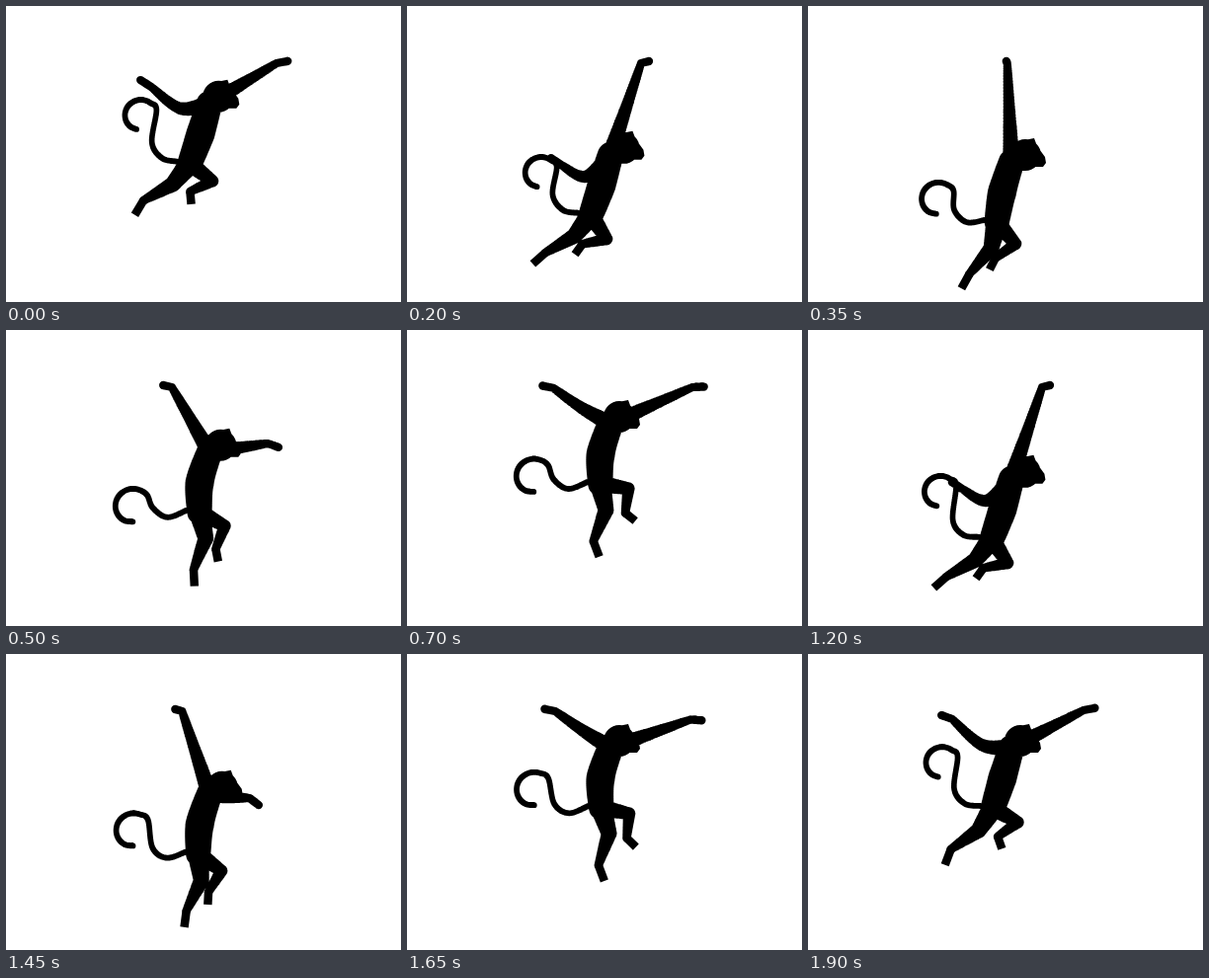
Write an HTML page that moves like this. It is 400 px wide and 300 px high and loops after 1950 ms.

```html
<!DOCTYPE html>
<html lang="en">
<head>
<meta charset="utf-8">
<title>Swinging monkey</title>
<style>
  html, body { margin: 0; width: 100%; height: 100%; overflow: hidden; background: #fff; }
  svg { display: block; width: 100vw; height: 100vh; }
</style>
</head>
<body>
<svg viewBox="0 0 400 300">
  <path id="body"/>
  <path id="feet" fill="none" stroke="#000" stroke-width="8.5"/>
</svg>
<script>
const LOOP = 1950, STEP = 50, SWING = 1000, CYCLE = 2 * SWING, RAD = Math.PI / 180;

// time, x, y of the wrist: hold the branch, let go, swing under, reach the next one
const wristPath = [
  [0, 274, 58], [200, 237, 58], [500, 168, 58], [650, 150, 58],
  [950, 146, 66], [1000, 147, 82], [1200, 156, 161], [1350, 200, 205],
  [1500, 265, 115], [1700, 289, 58], [1950, 279, 57]
];
const face = [[8, -22], [18, -24], [21, -16], [29, -5], [30, 1], [27, 5], [12, 5]];

const add = (a, b) => [a[0] + b[0], a[1] + b[1]];
const mix = (a, b, u) => a + (b - a) * u;
const wave = (time, peak, period = SWING) => Math.cos(2 * Math.PI * (time - peak) / period);

function ease(from, to, time) {
  const u = Math.max(0, Math.min(1, (time - from) / (to - from)));
  return Math.sin(u * Math.PI / 2) ** 2;
}

function hermite(a, b, ta, tb, u) {
  const v = 1 - u;
  return a * v * v * (1 + 2 * u) + b * u * u * (3 - 2 * u) + ta * u * v * v - tb * u * u * v;
}

function wristAt(time) {
  time = (time + CYCLE) % CYCLE;
  const n = wristPath.length;
  const key = i => {
    const turn = Math.floor(i / n), [t, x, y] = wristPath[i - turn * n];
    return [t + turn * CYCLE, x, y];
  };
  let i = n - 1;
  while (wristPath[i][0] > time) i--;
  const [a, b, c, d] = [i - 1, i, i + 1, i + 2].map(key);
  const span = c[0] - b[0];
  return [1, 2].map(k => hermite(b[k], c[k],
    (c[k] - a[k]) / (c[0] - a[0]) * span,
    (d[k] - b[k]) / (d[0] - b[0]) * span,
    (time - b[0]) / span));
}

const dot = ([x, y], r) => {
  r = +r.toFixed(2);
  return `M${(x - r).toFixed(2)} ${y.toFixed(2)}a${r} ${r} 0 1 1 ${2 * r} 0a${r} ${r} 0 1 1 ${-2 * r} 0z`;
};
const line = points => "M" + points.map(p => p.map(v => v.toFixed(2)).join(" ")).join("L");

// A rounded band of varying radius; without bend its joints stay sharp
function band(points, radii, bend = true) {
  const samples = 18, last = points.length - 1;
  const point = i => points[Math.max(0, Math.min(last, i))];
  let d = "";
  for (let i = 0; i < last; i++) {
    for (let s = 0; s <= samples; s++) {
      const u = s / samples;
      const spot = [0, 1].map(c => {
        const a = point(i)[c], b = point(i + 1)[c];
        if (!bend) return mix(a, b, u);
        return hermite(a, b, (b - point(i - 1)[c]) / 2, (point(i + 2)[c] - a) / 2, u);
      });
      d += dot(spot, mix(radii[i], radii[i + 1], u));
    }
  }
  return d;
}

function arm(shoulder, time) {
  time %= CYCLE;
  const wrist = wristAt(time);
  const drag = (wristAt(time + STEP / 2)[1] - wristAt(time - STEP / 2)[1]) / 4;
  const tip = add(wrist, [12 * Math.tanh((wrist[0] - 205) / 40), -2 - drag]);
  const slack = 17 * ease(550, 1200, time) * (1 - ease(1200, 1500, time));
  const elbow = [0, 1].map(c => mix(shoulder[c], wrist[c], 0.5) + c * slack);
  return band([shoulder, elbow, wrist], [9, 6.3, 4]) + band([wrist, tip], [4, 4.2], false);
}

// Joints of a leg from the hip down; angles are measured forward from straight down
function leg(hip, angles, lengths) {
  const joints = [hip];
  angles.forEach((angle, i) => {
    const a = angle * RAD;
    joints.push(add(joints[i], [lengths[i] * Math.sin(a), lengths[i] * Math.cos(a)]));
  });
  return joints;
}

function tail(hip, time) {
  const lift = 0.5 - wave(time, 90) / 2 - 0.05 * wave(time, 0, CYCLE);
  const sway = 7 * wave(time, 500, CYCLE);
  const center = add(hip, [-50 - 20 * lift, -49 + 40 * lift + sway]);
  const points = [];
  for (let i = 0; i <= 8; i++) {
    const a = (mix(105, 340, i / 8) - 20 * lift) * RAD;
    const r = mix(13.5, 18, i / 8) * (1 + 0.1 * lift);
    points.push(add(center, [r * Math.cos(a), r * Math.sin(a)]));
  }
  const base = add(hip, [-13, -2]);
  points.push(
    add(base, [-25 - 10 * lift, -20 + 19 * lift]),
    add(base, [-15 - 5 * lift, -4 + 12 * lift]),
    base);
  return band(points, points.map(() => 2.9));
}

const bodyPath = document.getElementById("body"), feetPath = document.getElementById("feet");

function draw(ms) {
  const step = Math.floor(ms % LOOP / STEP) * STEP;
  // the second swing is one step shorter
  const time = step > 1650 ? step + STEP : step;
  const phase = (time + STEP) % SWING - STEP;

  const sag = ease(-50, 270, phase) * (1 - ease(360, 625, phase));
  const back = wave(time, 95);
  const lean = -15 - 6 * back;
  const shoulder = [206, 95 + 63 * sag];
  const middle = add(shoulder, [lean / 2 - 2 + 3.5 * back, 31]);
  const hip = add(shoulder, [lean, 61]);
  const head = add(shoulder, [5 * sag, 0]);

  const rear = leg(hip,
    [-13 - 32 * back, -41 - 24 * back, -14 - 35 * wave(time, 170)], [27, 34, 17]);
  const front = leg(hip,
    [57 - 24 * wave(time, 220), -43 - 37 * wave(time, 150), 8 - 45 * wave(time, 240)], [29, 25, 13]);

  bodyPath.setAttribute("d",
    band([shoulder, middle, hip], [13, 14.5, 12.5]) +
    dot(add(head, [9, -7]), 16) + line(face.map(p => add(head, p))) + "Z" +
    arm(shoulder, time) + arm(shoulder, time + SWING) +
    band(rear.slice(0, 3), [11, 8, 4.3], false) +
    band(front.slice(0, 3), [9, 6.3, 4.3], false) +
    tail(hip, time));
  feetPath.setAttribute("d", line(rear.slice(2)) + line(front.slice(2)));
}

const start = performance.now();
function tick() {
  draw(performance.now() - start);
  requestAnimationFrame(tick);
}
tick();
</script>
</body>
</html>
```
